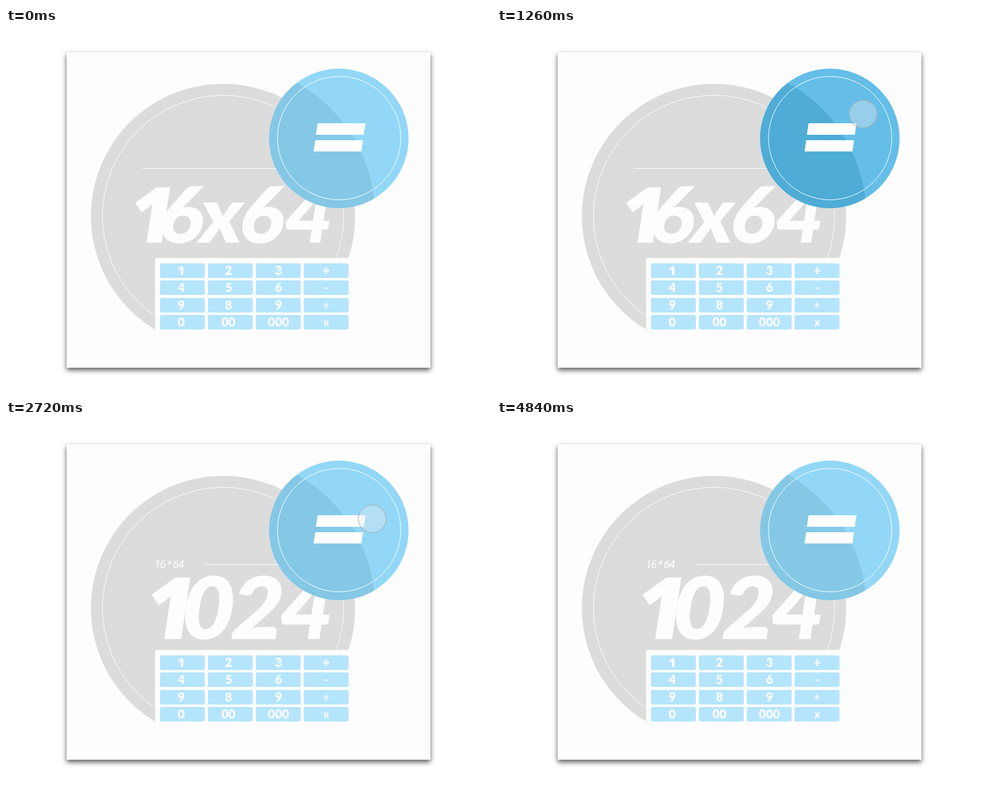
An HTML page with a canvas that plays this animation: 800 by 600 pixels, repeating every 5860 ms.

```html
<!DOCTYPE html>
<html lang="en">
<head>
<meta charset="utf-8">
<title>Calculator</title>
<style>
  html, body { margin: 0; width: 100%; height: 100%; overflow: hidden; background: #fff; }
  canvas { display: block; }
</style>
</head>
<body>
<canvas id="stage" width="800" height="600"></canvas>
<script>
const ctx = document.getElementById('stage').getContext('2d');
const LOOP = 5860, HOVER = 760, CLICK = 2310, MORPH = 410;
const PAPER = '#fdfdfd', SLANT = -0.15;
const KEYS = [['1', '2', '3', '+'], ['4', '5', '6', '-'], ['9', '8', '9', '÷'], ['0', '00', '000', 'x']];

const clamp = v => Math.min(1, Math.max(0, v));
const smooth = v => v * v * (3 - 2 * v);

// Eased value for a Bézier timing curve (x1, 0, x2, 1)
function ease(p, x1, x2) {
  let lo = 0, hi = 1, s = 0.5;
  for (let i = 0; i < 24; i++) {
    s = (lo + hi) / 2;
    const r = 1 - s;
    const x = 3 * s * r * r * x1 + 3 * s * s * r * x2 + s * s * s;
    if (x < p) lo = s; else hi = s;
  }
  return smooth(s);
}

function disc(x, y, r, fill) {
  ctx.beginPath();
  ctx.arc(x, y, r, 0, Math.PI * 2);
  ctx.fillStyle = fill;
  ctx.fill();
}

function ring(x, y, r, color, width) {
  ctx.beginPath();
  ctx.arc(x, y, r, 0, Math.PI * 2);
  ctx.strokeStyle = color;
  ctx.lineWidth = width;
  ctx.stroke();
}

function rule(x, y) {
  ctx.fillStyle = PAPER;
  ctx.fillRect(x, y, 490 - x, 1);
}

// A plain one without a foot suits the geometric figures better
const heavy = (ch, size) => ch === '1'
  ? `800 ${size}px "Open Sans", sans-serif`
  : `900 ${size}px Lato, sans-serif`;

// Slanted figures, each with its ink centred on the given x
function figures(text, centers, base, size) {
  ctx.save();
  ctx.transform(1, 0, SLANT, 1, 0, base);
  ctx.fillStyle = PAPER;
  ctx.textAlign = 'left';
  [...text].forEach((ch, i) => {
    ctx.font = heavy(ch, size);
    const m = ctx.measureText(ch);
    ctx.fillText(ch, centers[i] - (m.actualBoundingBoxRight - m.actualBoundingBoxLeft) / 2, 0);
  });
  ctx.restore();
}

function drawCard() {
  ctx.fillStyle = '#fff';
  ctx.fillRect(0, 0, 800, 600);
  ctx.save();
  ctx.shadowColor = 'rgba(0,0,0,0.65)';
  ctx.shadowBlur = 8;
  ctx.shadowOffsetY = 4;
  ctx.fillStyle = PAPER;
  ctx.fillRect(100, 40, 600, 520);
  ctx.restore();
}

function drawDisplay(t) {
  disc(358, 310, 218, '#dcdcdc');
  ring(358, 310, 199, PAPER, 1);
  if (t < CLICK) {
    rule(225, 231);
    figures('16x64', [230, 286, 350, 419, 492], 354, 128);
    return;
  }
  const rest = 1 - smooth(clamp((t - CLICK) / MORPH));
  ctx.save();
  ctx.translate(533, 231);
  ctx.scale(1 + 0.092 * rest, 1 - 0.046 * rest);
  ctx.translate(-533, -231);
  rule(328, 238);
  figures('1024', [259, 327, 408, 488], 361, 142);
  ctx.transform(1, 0, SLANT, 1, 0, 244);
  ctx.font = '400 18px Roboto, sans-serif';
  ctx.letterSpacing = '-1.4px';
  ctx.fillText('16 * 64', 268, 0);
  ctx.restore();
}

function drawKeys() {
  ctx.fillStyle = PAPER;
  ctx.fillRect(246, 379, 328, 160);
  ctx.textAlign = 'center';
  KEYS.forEach((row, r) => row.forEach((label, c) => {
    const x = 254 + 79 * c, y = Math.round(388 + 28.4 * r);
    ctx.fillStyle = '#b5e5fd';
    ctx.beginPath();
    ctx.roundRect(x, y, 74, 24, 3);
    ctx.fill();
    ctx.fillStyle = '#fff';
    ctx.font = heavy(label, c === 3 && r ? 17 : 20);
    ctx.fillText(label, x + [35, 34, 37.5, 37][c], y + (c === 3 && r ? 18 : 19));
  }));
}

function bar(x, y, h) {
  ctx.beginPath();
  ctx.moveTo(x, y);
  ctx.lineTo(x + 79, y);
  ctx.lineTo(x + 79 + SLANT * h, y + h);
  ctx.lineTo(x + SLANT * h, y + h);
  ctx.fillStyle = '#fff';
  ctx.fill();
}

function drawButton(t) {
  const active = t >= HOVER && t < CLICK;
  disc(549, 182, 115, active ? '#64bee8' : '#92d7f7');
  ctx.save();
  ctx.beginPath();
  ctx.arc(549, 182, 115, 0, Math.PI * 2);
  ctx.clip();
  disc(358, 310, 251, active ? '#4eacd6' : '#84c8e6');
  ctx.restore();
  ring(549.5, 181.5, 101.7, '#fff', 1);
  bar(514, 157, 19);
  bar(510, 185, 18.5);
}

function drawPointer(t) {
  if (t < 40 || t > 4540) return;
  const p = ease(clamp((t - 40) / 1700), 0.29, 0.58);
  const out = clamp((t - 4260) / 280);
  const x = 604 + 34 * Math.pow(1 - p, 3.3) + 130 * Math.pow(out, 2.6);
  const y = 16 + 147 * p;
  ctx.save();
  ctx.beginPath();
  ctx.rect(100, 40, 600, 520);
  ctx.clip();
  disc(x, y, 23, 'rgba(228,232,236,0.4)');
  ring(x, y, 23, 'rgba(160,170,178,0.5)', 2);
  ctx.restore();
}

function frame() {
  const t = performance.now() % LOOP;
  drawCard();
  drawDisplay(t);
  drawKeys();
  drawButton(t);
  drawPointer(t);
  requestAnimationFrame(frame);
}
frame();
</script>
</body>
</html>
```
